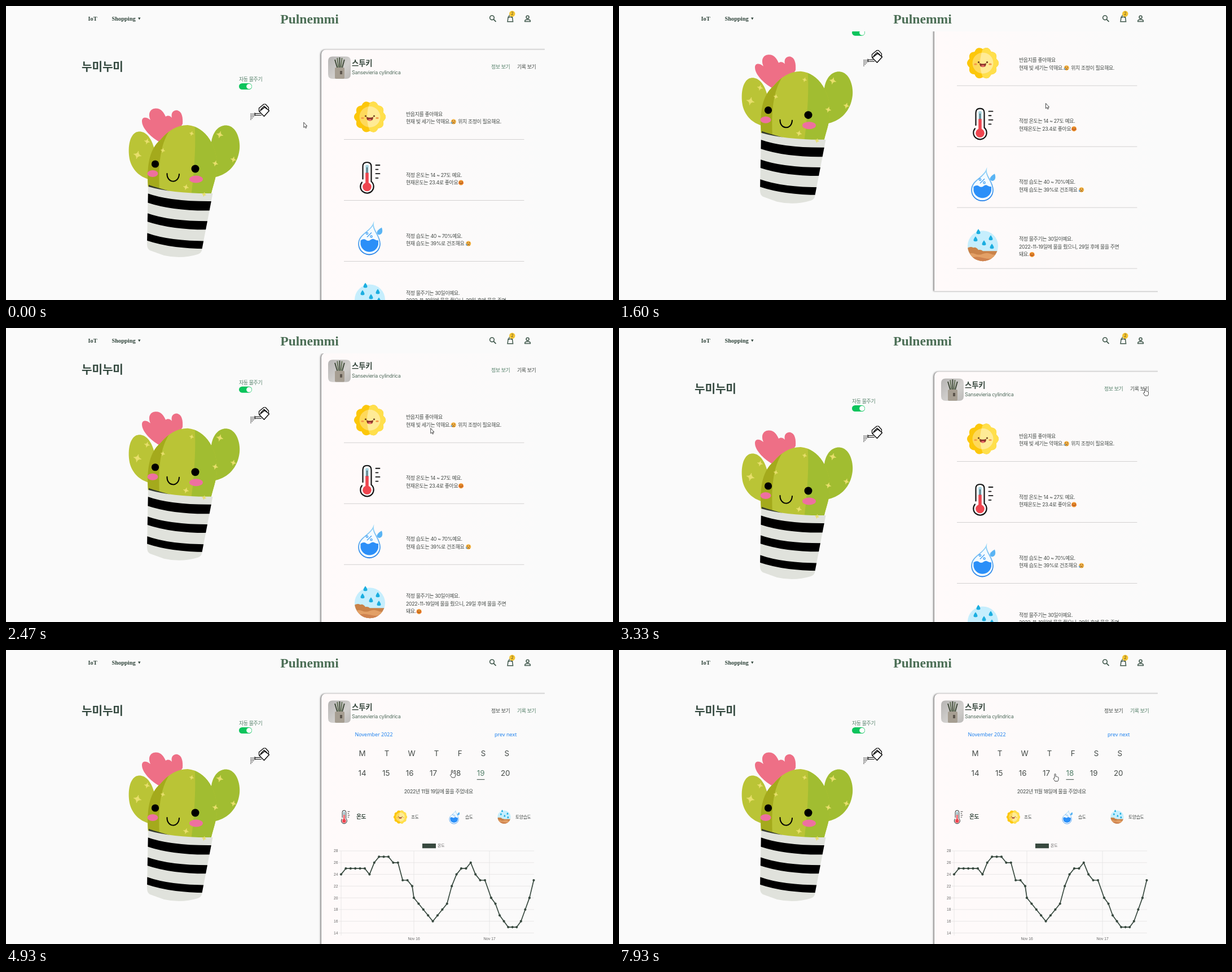
Recreate the animation shown at these times as an HTML page with a canvas. Size 1076x521 px, loop 8000 ms.

```html
<!DOCTYPE html>
<html lang="ko">
<head>
<meta charset="utf-8">
<title>Plant diary</title>
<style>
html, body { margin: 0; width: 100%; height: 100%; overflow: hidden; background: #fafafa; }
canvas { display: block; width: 1076px; height: 521px; }
</style>
</head>
<body>
<canvas id="stage"></canvas>
<script>
const W = 1076, H = 521, LOOP = 8000, STEP = 1000 / 15;
const canvas = document.getElementById('stage');
const dpr = window.devicePixelRatio || 1;
canvas.width = W * dpr;
canvas.height = H * dpr;
const c = canvas.getContext('2d');

const SANS = 'Inter, "Noto Sans CJK KR", sans-serif';
const UI = '"Noto Sans", sans-serif';
const AXIS = '"Liberation Sans", sans-serif';
const SERIF = '"Liberation Serif", serif';
const INK = '#454b48', GREEN = '#55806a', DARK = '#38493f';
const T_TAB = 3660, T_CHART = 3800, T_PICK = 7525;

// Each move: start, end, then the values reached.
const POINTER = [[70, 733, 757.5, 170.5], [1500, 1800, 752.5, 177.5], [2733, 3000, 943, 98],
  [3133, 3333, 932.5, 107], [3800, 4200, 960, 116], [4200, 4667, 922, 127], [4667, 4933, 790.5, 213],
  [4933, 5200, 600, 447], [5200, 5533, 648, 234], [5600, 5733, 648, 227.5], [5800, 6333, 789, 217],
  [6800, 6933, 775, 217.5], [7133, 7533, 789, 216], [7733, 7933, 773, 219.5]];
const SCROLL = [[970, 1225, 56], [1467, 1800, 168], [2133, 2600, 0]];

const smooth = u => u * u * (3 - 2 * u);
const quartOut = u => 1 - (1 - u) ** 4;
const progress = (t, a, b) => Math.min(1, Math.max(0, (t - a) / (b - a)));

function follow(from, moves, t) {
  return moves.reduce((pos, [a, b, ...to]) => {
    const k = smooth(progress(t, a, b));
    return pos.map((v, i) => v + (to[i] - v) * k);
  }, from);
}

function text(s, x, y, o = {}) {
  const size = o.size || 8.96;
  c.font = `${o.weight || 400} ${size}px ${o.font || SANS}`;
  c.letterSpacing = (o.track || 0) * size + 'px';
  c.textAlign = o.align || 'left';
  c.fillStyle = o.color || INK;
  c.fillText(s, x, y);
  return c.measureText(s).width;
}
const korean = (s, x, y, o = {}) => text(s, x, y, { track: -0.045, ...o });

function shape(d, fill, stroke, width = 1) {
  const p = new Path2D(d);
  if (fill) { c.fillStyle = fill; c.fill(p); }
  if (stroke) { c.strokeStyle = stroke; c.lineWidth = width; c.stroke(p); }
}
function oval(x, y, rx, ry, fill) {
  c.beginPath();
  c.ellipse(x, y, rx, ry, 0, 0, 7);
  c.fillStyle = fill;
  c.fill();
}
const dot = (x, y, r, fill) => oval(x, y, r, r, fill);
function ring(x, y, r, color, width) {
  c.beginPath();
  c.arc(x, y, r, 0, 7);
  c.strokeStyle = color;
  c.lineWidth = width;
  c.stroke();
}
function box(x, y, w, h, r, fill) {
  c.beginPath();
  c.roundRect(x, y, w, h, r);
  c.fillStyle = fill;
  c.fill();
}
const line = (x1, y1, x2, y2, color, width = 1) => shape(`M${x1} ${y1}L${x2} ${y2}`, null, color, width);
function at(x, y, s, draw) {
  c.save();
  c.translate(x, y);
  c.scale(s, s);
  draw();
  c.restore();
}
function clipped(d, draw) {
  c.save();
  c.clip(new Path2D(d));
  draw();
  c.restore();
}

function star(x, y, r) {
  at(x, y, r, () => {
    c.rotate(0.25);
    shape('M0-1Q.1-.15 1 0Q.1.15 0 1Q-.1.15-1 0Q-.1-.15 0-1Z', '#e8df6c', '#e8df6c', 0.1);
  });
}

function cactus() {
  const lime = '#bac436', leaf = '#a1bd31';
  const body = 'M252 322C250 290 251 256 274 237C287 221 303 211 322 211C355 214 375 250 374 285C373 305 366 320 362 340H300Z';
  shape('M272 241C255 231 241 216 241 204C241 196 249 196 256 202C251 190 256 182 265 181.500C275 181 280 189 283 196C288 193 291 195 294 198C292 189 297 184 304 185C312 187 314 198 313 209L300 230L280 242Z', '#ee6f86');
  shape('M262 250C255 226 241 219 230 224C216 232 216 260 220 275C226 294 240 304 256 308L275 290Z', lime);
  shape('M364 241C368 215 385 208 397 213C412 219 417 245 413 260C408 285 390 300 368 304L350 280Z', leaf);
  shape(body, lime);
  clipped(body, () => {
    shape('M334 205C337 235 335 290 327 345H400V205Z', leaf);
    shape('M303 205C278 230 267 262 273 345H240V205Z', '#a4aa1c');
  });
  shape('M253 317L262 320L300 331L253 326Z', '#333a2c');
  const pot = 'M252 320Q298 333 366.500 332L347 433Q346 438 340 440Q311 449 280 442L255 433Q250 430 250 422Z';
  shape(pot, '#e0e2dc');
  clipped(pot, () => {
    for (let i = 0; i < 3; i++) {
      const y = 332 + 35.3 * i, h = 16.5 - 1.5 * i;
      shape(`M248 ${y - 1}Q290 ${y + 15} 368 ${y + 14}L362 ${y + 14 + h}Q295 ${y + 15 + h} 248 ${y - 1 + h}Z`, '#000');
    }
  });
  [[233, 264, 7], [250, 240, 5], [278, 256, 4], [329, 226, 4], [379, 228, 6], [371, 279, 5],
    [403, 272, 5], [319, 321, 5], [351, 334, 4]].forEach(s => star(...s));
  oval(260, 297, 9.5, 6, '#ee70a0');
  oval(337, 307, 12, 6.5, '#ee70a0');
  dot(264.5, 280, 6.6, '#000');
  dot(335.5, 288.5, 7, '#000');
  c.lineCap = 'round';
  shape('M285.500 297C285 314 306 316 307 298', null, '#000', 2);
  c.lineCap = 'butt';
}

function wateringCan() {
  c.lineJoin = 'round';
  shape('M449 187L458.500 179.500L466.500 185.500L457.500 195.500Z', '#fff', '#000', 1.4);
  shape('M448.500 186.500V181L457 174H460L465.500 180V184M451 184L457.500 177.500L463 182', null, '#000', 1.2);
  shape('M451 190.500H441.500V193.500H453M441 189V195', null, '#000', 1);
  c.lineJoin = 'miter';
  c.fillStyle = '#222';
  for (let i = 0; i < 3; i++)
    for (let j = 0; j < 5 - i; j++) c.fillRect(433.4 + i * 2.3, 190.6 + j * 2.5, 1.2, 1.4);
}

function sun() {
  const rim = () => {
    c.beginPath();
    for (let a = 0; a < 6.28; a += 0.05) {
      const r = 24.8 + 3.2 * Math.abs(Math.cos(a * 5));
      c.lineTo(r * Math.cos(a), r * Math.sin(a));
    }
    c.closePath();
  };
  const bright = 'M2-30Q-12 0 2 30H32V-30Z';
  rim();
  c.fillStyle = '#fcc70b';
  c.fill();
  c.save();
  rim();
  c.clip();
  shape(bright, '#ffdf4c');
  c.restore();
  dot(0, 0, 18.5, '#fed95b');
  clipped(bright, () => dot(0, 0, 18.5, '#ffeb96'));
  for (const s of [-1, 1]) {
    dot(7.5 * s, -1.5, 1.6, '#6d4020');
    oval(13 * s, 2, 2.8, 1.6, '#f49a4a');
  }
  shape('M-6 0Q0 2.500 6 0Q6 7 0 7Q-6 7-6 0Z', '#8a3529');
  oval(0, 5.2, 3, 1.5, '#ef6a6a');
}

function thermometer() {
  shape('M-10.500 7V-21Q-10.500-27-5-27Q1-27 1-21V7', '#fff');
  dot(-5, 16, 11, '#fff');
  box(-7.8, -23, 5.6, 16, 2, '#a6d3de');
  box(-7.8, -9, 5.6, 24, 0, '#ef4650');
  dot(-5, 16, 7.8, '#ef4650');
  c.lineCap = 'round';
  shape('M-12.500 2V-20Q-12.500-27.500-5-27.500Q2.500-27.500 2.500-20V6.500A11.700 11.700 0 1 1-14 8', null, '#151515', 2.2);
  for (let i = 0; i < 4; i++) line(10.5, -22.5 + i * 7.6, i % 2 ? 14.5 : 17.5, -22.5 + i * 7.6, '#151515', 1.8);
  line(-5, -18, -5, -9, '#33424a', 1.4);
  c.lineCap = 'butt';
}

function humidity() {
  const g = c.createLinearGradient(0, -27, 0, 28);
  g.addColorStop(0, '#9bd8f8');
  g.addColorStop(1, '#237fe8');
  shape('M6-26C5-15 18-6 18 9A18.800 18.800 0 0 1-20 9C-20-8 0-12 6-26Z', '#f4fbff', g, 1.8);
  shape('M-16.500 3Q-11-1-7 2T1 2T8 1T15 3V10A16 16 0 0 1-16.500 10Z', '#2b8ff8');
  line(-5, -3, 3, -11, '#3d9df2', 1.3);
  ring(-5, -9.5, 1.7, '#3d9df2', 1.2);
  ring(2.5, -4, 1.7, '#3d9df2', 1.2);
  shape('M21-20Q24-12 20-8.500Q15-5 12.500-10Q12-15 21-20Z', '#5ab4f4');
}

const drip = (x, y) => shape(`M${x} ${y - 5}Q${x + 7} ${y + 4} ${x} ${y + 4}Q${x - 7} ${y + 4} ${x} ${y - 5}Z`, '#1caee0');
function soil() {
  const disc = 'M-27 0A27 27 0 1 1 27 0A27 27 0 1 1-27 0Z';
  shape(disc, '#c6eefd');
  clipped(disc, () => {
    shape('M-28 4Q-22 0-17 3Q-12 1-8 7Q-3 6 0 9H28V28H-28Z', '#c98249');
    shape('M-28 15Q-21 11-14 14T0 14T14 14T28 14V28H-28Z', '#e3a066');
    shape('M-28 23Q-14 17 0 21T28 20V30H-28Z', '#cf8350');
  });
  [[-8, -25], [-13, -12], [14, -14], [2, -5], [16, 1]].forEach(p => drip(...p));
}

function emoji(x, y, sad) {
  const bend = sad ? -1 : 1, brown = '#5c3016';
  dot(x, y, 4.5, sad ? '#f2b245' : '#f2932e');
  shape(`M${x - 2.2} ${y + 1.8 - bend}Q${x} ${y + 1.8 + bend * 1.6} ${x + 2.2} ${y + 1.8 - bend}`, null, brown, 0.9);
  for (const s of [-1, 1]) {
    dot(x + 1.8 * s, y - 1.2, 0.7, brown);
    if (!sad) dot(x + 3.2 * s, y + 1, 1, '#e8562f');
  }
  if (sad) oval(x - 3.5, y + 2, 1.1, 1.8, '#5d9fd6');
}

function photo() {
  clipped('M579 89.500H603Q611 89.500 611 97.500V121Q611 129 603 129H579Q571 129 571 121V97.500Q571 89.500 579 89.500Z', () => {
    const g = c.createLinearGradient(571, 90, 611, 129);
    g.addColorStop(0, '#b6b4b3');
    g.addColorStop(0.6, '#d2d0ce');
    g.addColorStop(1, '#bbb9b7');
    c.fillStyle = g;
    c.fillRect(571, 89, 41, 41);
    for (let i = 0; i < 5; i++)
      line(588 + i * 1.8, 112, 583 + i * 4.2, 91 + (i - 2) ** 2, i % 2 ? '#66745a' : '#414b3a', 2);
    box(583, 109, 17, 20, 2, '#a69e92');
    box(592, 115, 4, 6, 0, '#5c554d');
  });
}

const ICONS = [sun, thermometer, humidity, soil];
const FACTS = [
  ['반음지를 좋아해요', '현재 빛 세기는 약해요.☹ 위치 조정이 필요해요.'],
  ['적정 온도는 14 ~ 27도 예요.', '현재온도는 23.4로 좋아요☺'],
  ['적정 습도는 40 ~ 70%예요.', '현재 습도는 39%로 건조해요 ☹'],
  ['적정 물주기는 30일이예요.', '2022-11-19일에 물을 줬으니, 29일 후에 물을 주면', '돼요.☺']
];

// Text with ☹ and ☺ drawn as small faces.
function sentence(s, x, y) {
  for (const part of s.split(/([☹☺])/)) {
    if (part === '☹' || part === '☺') {
      emoji(x + 5.3, y - 3, part === '☹');
      x += 11;
    } else x += korean(part, x, y);
  }
}

function infoView() {
  FACTS.forEach((lines, i) => {
    const y = 108 * i;
    line(599, 236.5 + y, 918.5, 236.5 + y, '#d3d1d1');
    at(645, 196.5 + y, 1, ICONS[i]);
    lines.forEach((s, j) => sentence(s, 709, 208 + y + 13.5 * (j - lines.length / 2)));
  });
}

// Daily swing: a few turning points, readings rounded to whole degrees.
const SWING = [[594, 23.5], [603, 25], [645, 24.4], [661, 27], [695, 26], [704, 23], [712, 23], [720, 22],
  [723, 20], [756, 16], [782, 19], [798, 24.2], [823.5, 26], [832, 24], [849, 23], [860, 20],
  [889, 15], [911, 15], [936, 23]];
function degrees(x) {
  const i = Math.max(1, SWING.findIndex(p => p[0] >= x));
  const [[x0, v0], [x1, v1]] = [SWING[i - 1], SWING[i]];
  return Math.round(v0 + (v1 - v0) * (x - x0) / (x1 - x0));
}
const TIMES = [[594, 16, 8.4], [723, 16, 8.4], [860, 11, 7.55]]
  .flatMap(([x, n, gap]) => Array.from({ length: n }, (_, i) => x + i * gap));
const levelY = v => 501.5 - (v - 14) * 10.39;

function chart(t) {
  if (t < T_CHART) return;
  const k = quartOut(progress(t, T_CHART, T_CHART + 900));
  const label = { size: 6.7, font: AXIS, color: '#666' }, grid = '#e4e2e2';
  box(738, 343, 24, 8.3, 0, DARK);
  korean('온도', 765, 349.3, { size: 7, color: '#666' });
  for (let v = 14; v <= 28; v += 2) {
    const y = levelY(v);
    line(590, y, 936, y, grid, 0.8);
    text(v, 588.5, y + 2.4, { ...label, align: 'right' });
  }
  [[594, ''], [723, 'Nov 16'], [857, 'Nov 17']].forEach(([x, day]) => {
    line(x, 356, x, 506, grid, 0.8);
    text(day, x, 513.7, { ...label, align: 'center' });
  });
  const pts = TIMES.map(x => [x, levelY(14 + (degrees(x) - 14) * k)]);
  c.lineJoin = 'round';
  shape('M' + pts.map(p => p.join(' ')).join('L'), null, DARK, 1.7);
  c.lineJoin = 'miter';
  pts.forEach(([x, y]) => dot(x, y, 2.1, DARK));
}

// Equal gaps between words, like a flex row.
function spread(words, left, right, y, picked) {
  const size = 13.4;
  c.font = `400 ${size}px ${SANS}`;
  c.letterSpacing = '0px';
  const widths = words.map(w => c.measureText(w).width);
  const gap = (right - left - widths.reduce((a, b) => a + b)) / (words.length - 1);
  words.forEach((w, i) => {
    const on = w === picked;
    text(w, left, y, { size, color: on ? GREEN : INK });
    if (on) line(left, y + 6.8, left + widths[i], y + 6.8, '#56645c', 1.2);
    left += widths[i] + gap;
  });
}

function recordView(t) {
  const day = t >= T_PICK ? '18' : '19';
  const link = { font: UI, color: '#1f82ee' };
  text('November 2022', 618.5, 153.3, link);
  text('prev', 866, 153.3, link);
  text('next', 887, 153.3, link);
  spread([...'MTWTFSS'], 625.5, 892, 188);
  spread(Array.from({ length: 7 }, (_, i) => String(14 + i)), 624.5, 893.5, 222.7, day);
  korean(`2022년 11월 ${day}일에 물을 주었네요`, 766.7, 253.7, { align: 'center' });
  const tabs = [[thermometer, 601.5], [sun, 699], [humidity, 794.5], [soil, 883]];
  tabs.forEach(([icon, x]) => at(x, 296, 0.43, icon));
  korean('온도', 621, 299.3, { size: 9.7, weight: 700, color: DARK });
  korean('조도', 718, 298.7, { size: 7.8 });
  korean('습도', 814, 298.7, { size: 7.8 });
  korean('토양습도', 903, 298.7, { size: 7.8 });
  chart(t);
}

function panel(t) {
  const record = t >= T_TAB;
  c.save();
  c.beginPath();
  c.rect(540, 60, 415, 620);
  c.clip();
  const g = c.createLinearGradient(559, 0, 955, 0);
  g.addColorStop(0, '#fffafa');
  g.addColorStop(1, '#fafafa');
  c.shadowColor = 'rgba(0,0,0,.5)';
  c.shadowBlur = 3 * dpr;
  c.shadowOffsetX = -1.7 * dpr;
  box(559, 77.5, 450, record ? 560 : 523, [8, 0, 0, 0], g);
  c.restore();
  photo();
  korean('스투키', 613, 105.5, { size: 13.4, weight: 700, color: DARK, track: -0.01 });
  text('Sansevieria cylindrica', 613, 121.2, { track: -0.03, color: '#4f6b5c' });
  korean('정보 보기', 860, 111.3, { color: record ? INK : GREEN });
  korean('기록 보기', 906, 111.3, { color: record ? GREEN : INK });
  record ? recordView(t) : infoView();
}

function header() {
  const ink = '#3f574b';
  box(0, 0, W, 45, 0, '#fafafa');
  const menu = { size: 10.4, weight: 700, font: SERIF, color: '#2f443a' };
  text('IoT', 145.5, 26.3, menu);
  text('Shopping', 187.5, 26.3, menu);
  shape('M234 20.500H238.500L236.250 24.500Z', '#2f443a');
  text('Pulnemmi', 538, 30.5, { size: 23.6, weight: 700, font: SERIF, color: '#4b6e55', align: 'center' });
  ring(861.5, 20.8, 3.8, ink, 1.6);
  line(864.3, 23.6, 868.5, 27.8, ink, 1.8);
  shape('M890.200 19.500H897.500L898.600 27.700H889.100Z', null, ink, 1.5);
  shape('M891.500 21V18.500Q891.500 16 893.900 16Q896.300 16 896.300 18.500V21', null, ink, 1.2);
  dot(897.3, 13.7, 5.2, '#f4c430');
  text('2', 897.3, 16.2, { size: 7, align: 'center', color: '#544b2b' });
  ring(924.6, 19.7, 2.5, ink, 1.5);
  shape('M919.800 27.600V26.500Q920 24 924.600 24Q929.300 24 929.400 26.500V27.600Z', null, ink, 1.5);
}

function pointer(t) {
  const [x, y] = follow([527.5, 206], POINTER, t);
  const onTab = x > 902 && x < 948 && y > 96 && y < 122;
  const onDays = t >= T_TAB && x > 615 && x < 905 && y > 204 && y < 237;
  const arrow = 'M.3.200V9.300L2.300 7.500L3.700 10.500L5.200 9.800L3.900 6.900H6.400Z';
  const hand = 'M-.9 8V1Q-.9 0 .2 0Q1.200 0 1.200 1V4.700Q2.500 4.200 2.900 5.200Q4.200 4.700 4.500 5.700Q6 5.300 6 6.800V9.500Q6 11.500 4.800 13H-.2Q-.8 11.500-2.800 9.200Q-3.300 8-2.200 7.500Q-1.500 7.400-.9 8Z';
  at(x, y, 1, () => shape(onTab || onDays ? hand : arrow, '#fff', '#333', 0.9));
}

function draw(now) {
  const t = Math.floor((now % LOOP + 4) / STEP) * STEP;
  c.setTransform(dpr, 0, 0, dpr, 0, 0);
  box(0, 0, W, H, 0, '#fafafa');
  c.save();
  c.translate(0, -follow([0], SCROLL, t)[0]);
  text('누미누미', 134, 114.5, { size: 20.3, weight: 700, color: '#354a40', track: -0.01 });
  korean('자동 물주기', 413, 132.8, { color: GREEN });
  box(413, 137, 23, 11, 5.5, '#0cc45c');
  dot(430.8, 142.5, 4.6, '#fff');
  wateringCan();
  cactus();
  panel(t);
  c.restore();
  header();
  pointer(t);
}

const start = performance.now();
(function tick() {
  draw(performance.now() - start);
  requestAnimationFrame(tick);
})();
</script>
</body>
</html>
```
